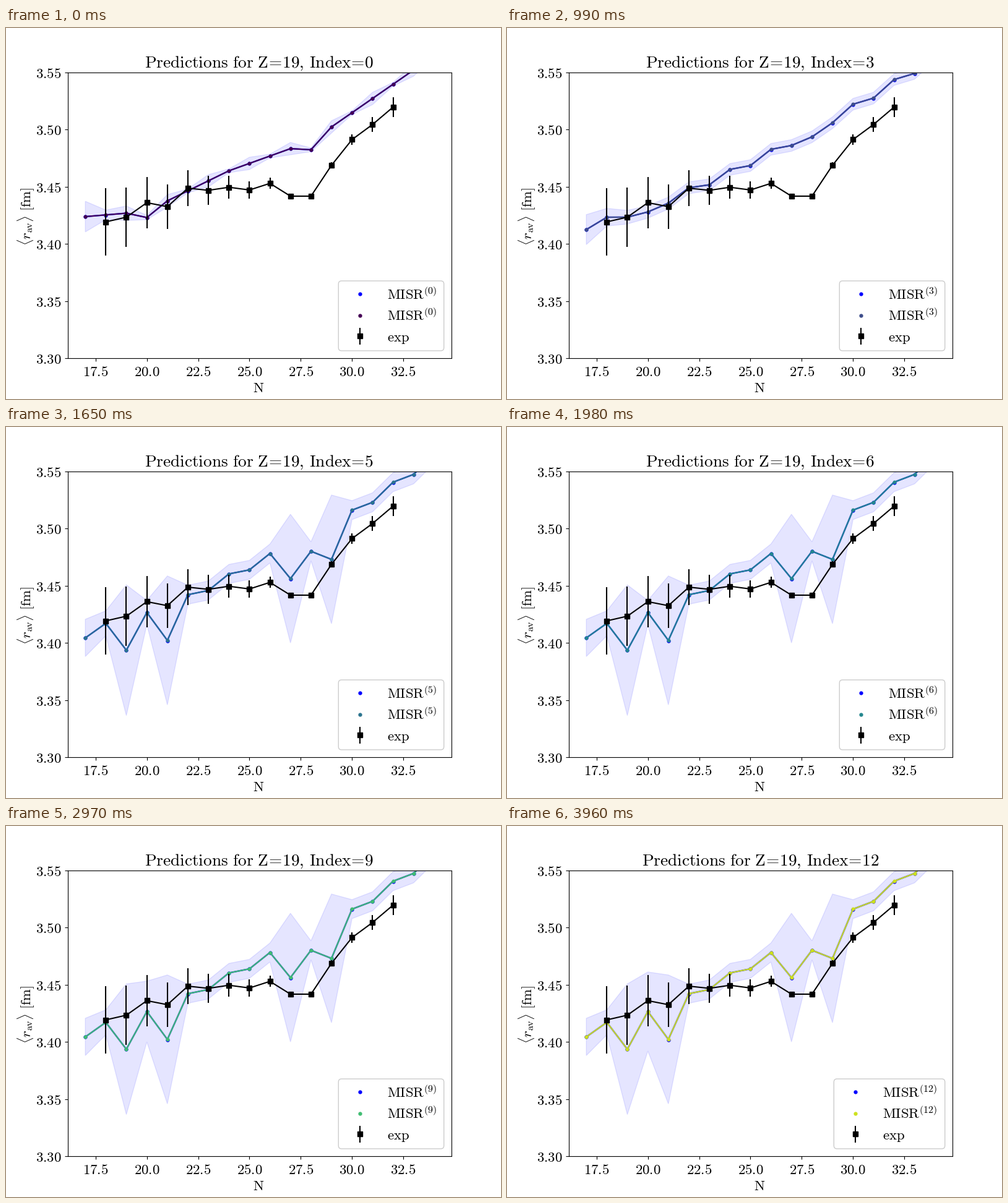
Recreate the animation shown at these times as a matplotlib script. Size 800 px wide and 600 px high, loop 4290 ms.

```python
import numpy as np
import matplotlib.pyplot as plt
from matplotlib.animation import FuncAnimation
from matplotlib.patches import FancyBboxPatch

W, H = 800, 600
STEPS, INTERVAL = 13, 330
SIZE, TITLE_SIZE = 16.4, 19.7

plt.rcParams["mathtext.fontset"] = "cm"

# All radii below are in 1e-3 fm above 3.4 fm
N = np.arange(17, 35)
ODD = np.where(N % 2, 1, -1)
BESIDE_SHELL = np.isin(N, [19, 21, 27, 29])

# Smooth trend: bends at the closed shells N = 20 and 28
KNOTS = [17, 19, 20, 21, 24, 27, 28, 29, 34]
TREND = {
    0: [23.9, 26.9, 23.1, 37.7, 64.0, 83.4, 82.4, 102.4, 164.6],
    2: [20.7, 27.7, 27.2, 39.6, 63.2, 89.9, 92.6, 110.0, 163.0],
    4: [9.8, 24.5, 23.4, 37.2, 61.8, 87.8, 89.4, 107.5, 162.4],
    5: [7.1, 21.8, 23.9, 30.4, 57.7, 84.5, 77.5, 101.3, 162.4],
}

EXP_N = np.arange(18, 33)
EXP_R = [19.3, 23.4, 36.1, 32.6, 48.8, 46.9, 49.6, 47.2,
         53.0, 41.8, 41.8, 68.8, 91.3, 104.5, 119.7]
EXP_ERR = np.interp(EXP_N, [18, 23, 26, 27, 28, 32], [29.3, 12.6, 4.9, 0.8, 0.5, 8.7])


def fm(r):
    return 3.4 + np.asarray(r) / 1000


def predict(i):
    """Mean radius and half width of its band at iteration i."""
    trend = [np.interp(i, list(TREND), col) for col in zip(*TREND.values())]
    mean = np.interp(N, KNOTS, trend) - np.interp(i, [0, 2], [0, 2.7]) * ODD
    spread = np.interp(i, [0, 2, 4, 5], [3.5, 5.1, 5.1, 8.3]) + 8 * np.exp((17 - N) / 0.9)
    spread += np.interp(i, [0, 2], [1.9, 0]) * ODD
    if i >= 5:
        mean -= 25.5 * BESIDE_SHELL
        spread += 48 * BESIDE_SHELL
        spread[N == 20] += np.interp(i, [7, 10], [2, 26])
    return mean, spread


def rm(s):
    return rf"$\mathrm{{{s}}}$"


fig = plt.figure(figsize=(W / 100, H / 100), dpi=100, facecolor="white")
ax = fig.add_axes([0.125, 0.11, 0.775, 0.77])
ax.set_xlim(16.15, 34.85)
ax.set_ylim(3.3, 3.55)
xt = np.arange(17.5, 33, 2.5)
yt = np.arange(3.30, 3.56, 0.05)
ax.set_xticks(xt, [rm(f"{v:.1f}") for v in xt], fontsize=SIZE)
ax.set_yticks(yt, [rm(f"{v:.2f}") for v in yt], fontsize=SIZE)
ax.tick_params(axis="both", pad=4.2)

band, = ax.fill([17, 34, 34], [3.4, 3.4, 3.5], color="blue", alpha=0.1, lw=1)
blue_line, = ax.plot([], [], "-", color="blue", lw=1.7)
blue_dots, = ax.plot([], [], ".", color="blue", ms=7)
line, = ax.plot([], [], "-", lw=1.5)
dots, = ax.plot([], [], ".", ms=6.5)
ax.errorbar(EXP_N, fm(EXP_R), EXP_ERR / 1000, fmt="s-", color="black",
            ms=6, lw=1.5, zorder=2.2)

# Overlay in stage pixels for titles and legend
top = fig.add_axes([0, 0, 1, 1])
top.set_xlim(0, W)
top.set_ylim(H, 0)
top.axis("off")


def label(x, y, s="", size=SIZE, ha="left", **kw):
    return top.text(x, y, s, fontsize=size, ha=ha, va="baseline", **kw)


title = label(409.5, 63.3, size=TITLE_SIZE, ha="center")
label(408.5, 589, rm("N"), ha="center")
label(40, 304.5, r"$\langle r_{\mathrm{av}}\rangle\ \mathrm{[fm]}$", ha="center",
      rotation=90, rotation_mode="anchor")

box = FancyBboxPatch((0, 409), 170, 113, fc=(1, 1, 1, 0.8), ec="0.8", lw=1,
                     boxstyle="round,pad=0,rounding_size=5")
top.add_patch(box)
key_blue, = top.plot([], [], ".", color="blue", ms=7)
key_dot, = top.plot([], [], ".", ms=7)
key_bar, = top.plot([], [], "-", color="black", lw=1.5)
key_square, = top.plot([], [], "s", color="black", ms=6)
names = [label(0, 438.5), label(0, 473), label(0, 506.7, rm("exp"))]


def update(i):
    mean, spread = predict(i)
    color = plt.cm.viridis(i / STEPS)

    edge = np.r_[mean - spread, (mean + spread)[::-1]]
    band.set_xy(np.column_stack([np.r_[N, N[::-1]], fm(edge)]))
    blue_line.set_data(N, fm(mean))
    blue_dots.set_data(N, fm(mean - 0.2))
    for art in (line, dots):
        art.set_data(N, fm(mean))
        art.set_color(color)
    title.set_text(rm(rf"Predictions\ for\ Z\!=\!19,\,Index\!=\!{i}"))

    left = 537.3 if i < 10 else 528.3
    mid = left + 34.7
    box.set_bounds(left, 409, 707.7 - left, 113)
    key_blue.set_data([mid], [430.3])
    key_dot.set_data([mid], [464.8])
    key_dot.set_color(color)
    key_bar.set_data([mid, mid], [485.5, 510.5])
    key_square.set_data([mid], [498])
    for name in names:
        name.set_x(left + 78.5)
    for name in names[:2]:
        name.set_text(rf"$\mathrm{{MISR}}^{{\mathrm{{({i})}}}}$")
    return []


anim = FuncAnimation(fig, update, frames=STEPS, interval=INTERVAL,
                     init_func=lambda: update(0), repeat=True, blit=False)
plt.show()
```
